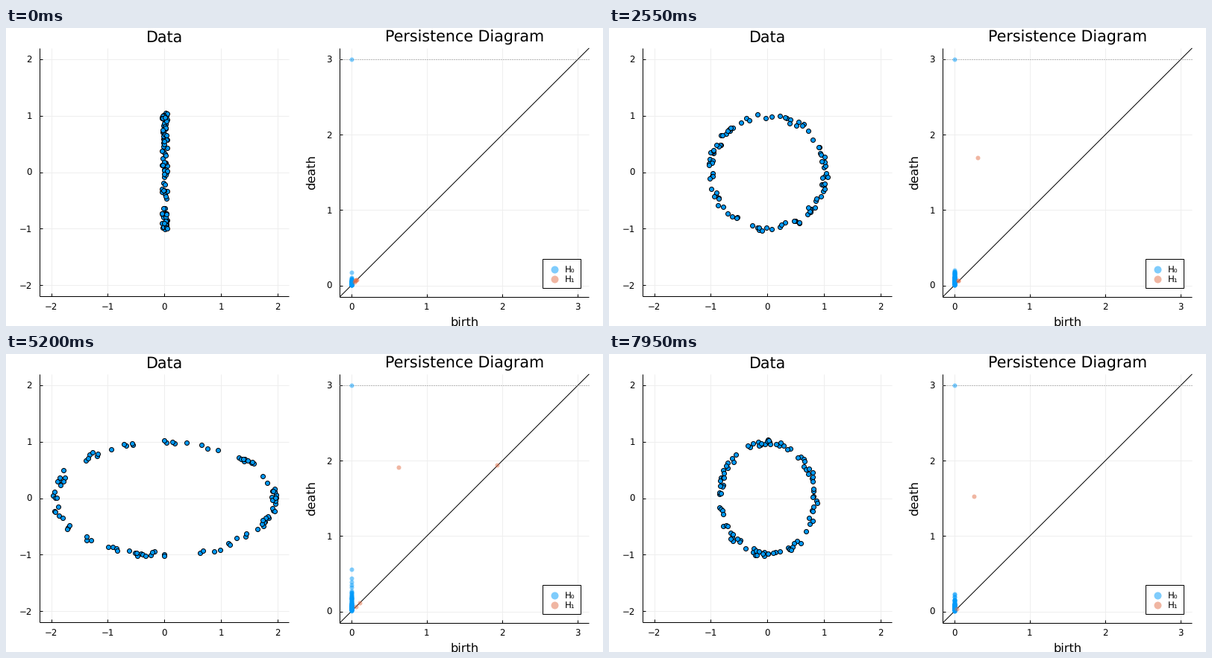
Write a matplotlib script that moves like this. It is 800x400 px and loops after 8 s.

```python
import math
import numpy as np
import matplotlib.pyplot as plt
from matplotlib.animation import FuncAnimation

FRAMES, N = 160, 100
PEAK = 2.0                     # widest half-axis, held for two frames
PX = 0.72                      # one pixel in points at 100 dpi
BLUE, ORANGE = "#009AFA", "#E36F47"
plt.rcParams["text.hinting"] = "none"


def half_width(n):
    return min(0.02 * n, PEAK, 0.02 * (201 - n))


def sample(rng, a):
    """Angles and noisy points on an ellipse of half-axes a and 1."""
    t = rng.uniform(0, 2 * math.pi, N)
    ring = np.column_stack([a * np.cos(t), np.sin(t)])
    return t, ring + rng.uniform(-.05, .05, (N, 2))


def persistence(t, pts):
    """Merge lengths of the components and birth of the loop round the centre."""
    i, j = np.triu_indices(N, 1)
    length = np.hypot(*(pts[i] - pts[j]).T)
    turn = (t[j] - t[i] + math.pi) % (2 * math.pi) - math.pi
    comp, pot = np.arange(N), np.zeros(N)
    merges, birth = [], None
    for k in np.argsort(length):
        p, q = i[k], j[k]
        shift = pot[p] + turn[k] - pot[q]
        if comp[p] != comp[q]:
            part = comp == comp[q]
            pot[part] += shift
            comp[part] = comp[p]
            merges.append(length[k])
        elif birth is None and abs(shift) > math.pi:
            birth = length[k]
        if birth is not None and len(merges) == N - 1:
            break
    return merges, birth


def loop_death(a):
    """Scale at which triangles fill the ellipse."""
    low, high = sorted((a, 1))
    e = min(high / max(low, 1e-9), math.sqrt(3))
    return low * 4 * math.sqrt(3) * e / (e * e + 3)


def state(n):
    rng = np.random.default_rng(500 + n)
    a = half_width(n)
    t, pts = sample(rng, a)
    merges, birth = persistence(t, pts)

    count = rng.poisson(1.2 + 6 * math.exp(-a / .06))
    births = rng.uniform(.03, .08 + min(a, .5) * .12, count)
    loops = [(b, b + .008) for b in births]
    if (.15 < a < .55 or a > 1.85) and rng.random() < .25:
        b = min(1.7 * a, 1.93)               # short-lived loop across the waist
        loops.append((b, b + .01))
    death = loop_death(a) - .03 - .02 * a + rng.uniform(-.02, .02)
    if birth < death:
        loops.append((birth, death))
    return pts, merges, np.array(loops).reshape(-1, 2)


def left_px(x, y):
    return 212.3 + 75.85 * np.asarray(x), 193.6 - 75.85 * np.asarray(y)


def right_px(x, y):
    return 462.6 + 101.2 * np.asarray(x), 345.6 - 101.15 * np.asarray(y)


fig = plt.figure(figsize=(8, 4), dpi=100, facecolor="white")
ax = fig.add_axes([0, 0, 1, 1])
ax.set_xlim(0, 800)
ax.set_ylim(400, 0)
ax.axis("off")


def line(xs, ys, color="black", **kw):
    ax.plot(xs, ys, color=color, lw=PX, solid_capstyle="butt", **kw)


def text(x, y, s, px, ha="center", **kw):
    ax.text(x, y, s, fontsize=px * PX, ha=ha, va="baseline",
            family="DejaVu Sans", **kw)


def panel(to_px, lo, hi, ticks, title):
    (x0, x1), (y0, y1) = to_px([lo, hi], [lo, hi])
    for v in ticks:
        x, y = to_px(v, v)
        line([x, x], [y0, y1], "#eeeeee")
        line([x0, x1], [y, y], "#eeeeee")
    line([x0, x1], [y0, y0])
    line([x0, x0], [y0, y1])
    for v in ticks:
        x, y = to_px(v, v)
        line([x, x], [y0, y0 - 4])
        line([x0, x0 + 4], [y, y])
        label = str(v).replace("-", "\u2212")
        text(x, 378.5, label, 11.8)
        text(x0 - 10.6, y + 4.4, label, 11.8, "right")
    text((x0 + x1) / 2, 18.3, title, 20.6)
    return x0, x1, y0, y1


def dots(color, size, **kw):
    return ax.plot([], [], "o", color=color, ms=size * PX, **kw)[0]


panel(left_px, -2.2, 2.2, range(-2, 3), "Data")
x0, x1, y0, y1 = panel(right_px, -.15, 3.15, range(4), "Persistence Diagram")
text((x0 + x1) / 2, 399.7, "birth", 16.2)
text(414, 194, "death", 16.2, rotation=90, rotation_mode="anchor")
line([x0, x1], [y0, y1])
top = right_px(0, 3)[1]
line([x0, x1], [top, top], "#888888", ls=(0, (1, 2)), dash_capstyle="butt")

data = dots(BLUE, 6, mec="black", mew=PX)
h0 = dots(BLUE, 6, mew=0, alpha=.5)
h1 = dots(ORANGE, 6, mew=0, alpha=.5)

ax.add_patch(plt.Rectangle((719, 310), 51, 39, fc="white", ec="black",
                           lw=PX, zorder=3))
for y, color, label in ((324, BLUE, "H\u2080"), (337, ORANGE, "H\u2081")):
    dots(color, 10, mew=0, alpha=.5, zorder=4).set_data([734.5], [y])
    text(749, y + 4.3, label, 11.8, "left", zorder=4)


def draw(n):
    pts, merges, loops = state(n)
    data.set_data(*left_px(*pts.T))
    h0.set_data(*right_px(np.zeros(N), merges + [3]))
    h1.set_data(*right_px(*loops.T))
    return data, h0, h1


anim = FuncAnimation(fig, draw, frames=FRAMES, interval=50, repeat=True,
                     repeat_delay=0)
plt.show()
```
